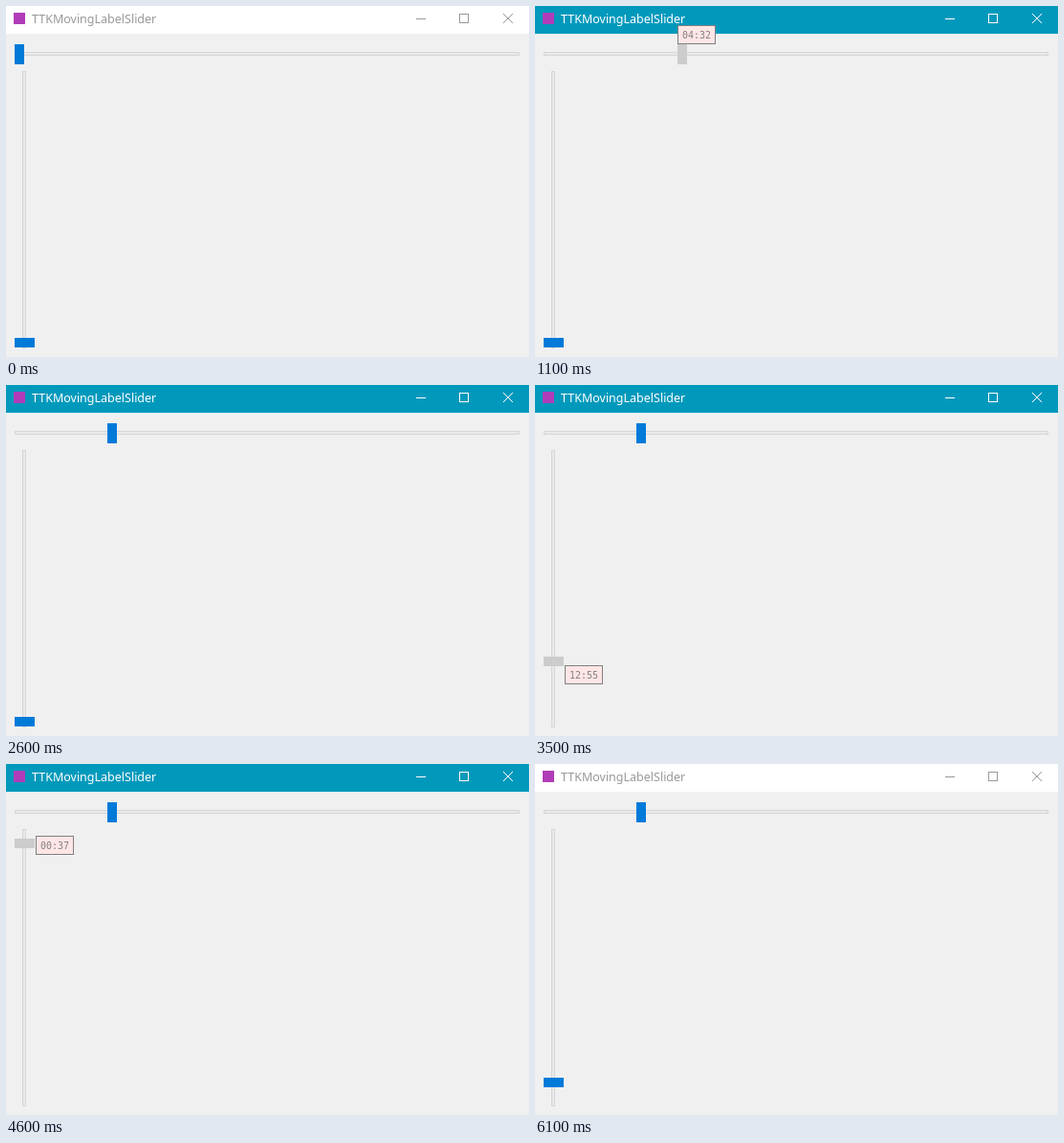
Write an HTML page with a canvas that moves like this. It is 547x367 px and loops after 7300 ms.

```html
<!DOCTYPE html>
<html lang="en">
<head>
<meta charset="utf-8">
<title>Moving label slider</title>
<style>
  html, body { margin: 0; width: 100%; height: 100%; overflow: hidden; background: #f0f0f0; }
  canvas { display: block; }
</style>
</head>
<body>
<canvas id="stage" width="547" height="367"></canvas>
<script>
const ctx = document.getElementById('stage').getContext('2d');
const LOOP = 7300, STEP = 100;

// Turning points of each drag: [time in ms, slider value 0..1000]
const across = [[100, 0], [600, 313], [700, 313], [1100, 272], [1500, 353], [1900, 935], [2500, 188]];
const down = [[3000, 1000], [3500, 775], [3700, 474], [4200, 11], [4500, 11], [5500, 933]];

function valueAt(keys, t) {
  const next = keys.findIndex(k => k[0] > t);
  if (next === 0) return keys[0][1];
  if (next < 0) return keys.at(-1)[1];
  const [t0, v0] = keys[next - 1], [t1, v1] = keys[next];
  const u = (t - t0) / (t1 - t0);
  return Math.round(v0 + (v1 - v0) * u * u * (3 - 2 * u));
}

const isPressed = (keys, t) => t >= keys[0][0] && t <= keys.at(-1)[0];

function box(x, y, w, h, fill, border) {
  ctx.fillStyle = fill;
  ctx.fillRect(x, y, w, h);
  if (!border) return;
  ctx.strokeStyle = border;
  ctx.strokeRect(x + 0.5, y + 0.5, w - 1, h - 1);
}

function text(str, x, y, font, color) {
  ctx.font = font;
  ctx.fillStyle = color;
  ctx.fillText(str, x, y);
}

function line(x1, y1, x2, y2) {
  ctx.beginPath();
  ctx.moveTo(x1, y1);
  ctx.lineTo(x2, y2);
  ctx.stroke();
}

function titleBar(active) {
  const ink = active ? '#fff' : '#999';
  box(0, 0, 547, 29, active ? '#0099bc' : '#fff');
  box(8, 7, 12, 12, '#b03cb8');
  text('TTKMovingLabelSlider', 27, 18, '12.5px "Noto Sans", sans-serif', ink);
  ctx.strokeStyle = ink;
  line(429, 13.5, 439, 13.5);
  ctx.strokeRect(474.5, 8.5, 9, 9);
  line(520, 8, 530, 18);
  line(530, 8, 520, 18);
}

function tip(x, y, value) {
  const pad = n => String(n).padStart(2, '0');
  box(x, y, 40, 20, '#ffe6e6', '#808080');
  text(pad(Math.floor(value / 60)) + ':' + pad(value % 60), x + 5, y + 14,
       '10px "DejaVu Sans Mono", monospace', '#858080');
}

function draw(t) {
  const h = valueAt(across, t), v = valueAt(down, t);
  const handleColor = keys => isPressed(keys, t) ? '#ccc' : '#007ad9';
  box(0, 0, 547, 367, '#f0f0f0');
  titleBar(t >= 800 && t < 6100);
  box(9, 48, 528, 4, '#e7eaea', '#d6d6d6');
  box(17, 68, 4, 290, '#e7eaea', '#d6d6d6');
  box(9 + Math.floor(h * 0.517), 40, 10, 21, handleColor(across));
  box(9, 68 + Math.floor(v * 0.279), 21, 10, handleColor(down));
  // The label follows the pointer, which travels a little further than the handle.
  if (isPressed(across, t)) tip(Math.round(3 + h * 0.536), 20, h);
  if (isPressed(down, t)) tip(31, Math.round(64 + v * 0.2955), v);
}

const origin = performance.now();
function tick() {
  const t = (performance.now() - origin) % LOOP;
  draw(Math.floor(t / STEP) * STEP);
  requestAnimationFrame(tick);
}
tick();
</script>
</body>
</html>
```
